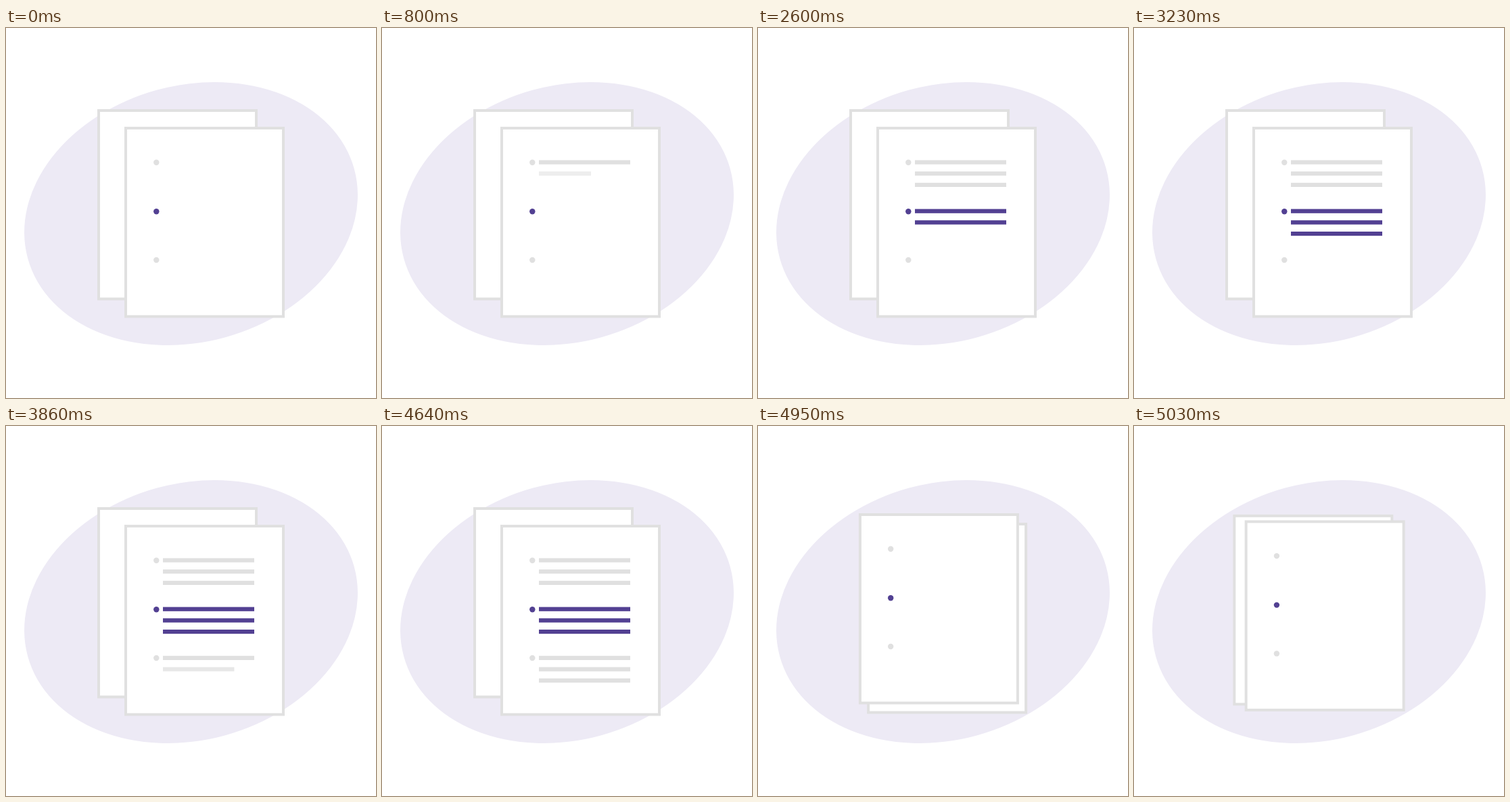
An HTML page that plays this animation: 547x547 px, repeating every 5110 ms.

```html
<!DOCTYPE html>
<html lang="en">
<head>
<meta charset="utf-8">
<title>Document list</title>
<style>
  html, body { margin: 0; height: 100%; overflow: hidden; background: #fff; }
  svg { display: block; width: 100vw; height: 100vh; }
</style>
</head>
<body>
<svg viewBox="0 0 547 547">
  <ellipse cx="273.5" cy="274.5" rx="250.2" ry="189.6" fill="#edeaf5" transform="rotate(-15.3 273.5 274.5)"/>
  <g id="pages"></g>
</svg>
<script>
const LOOP = 5110, FRAMES = 65, STEP = LOOP / FRAMES;
const GREY = '#e0e0e0', PURPLE = '#524092';
const GROW = 3.45;                                        // steps a bar takes to grow
const STARTS = [3, 9.37, 16, 22.37, 29, 35.37, 42, 48, 55]; // step at which each bar starts
const SPREAD = 61;                                        // step at which the pages part
const BACK = [-40, -26];
const pages = document.getElementById('pages');

function add(parent, tag, attrs) {
  const el = document.createElementNS('http://www.w3.org/2000/svg', tag);
  for (const key in attrs) el.setAttribute(key, attrs[key]);
  return parent.appendChild(el);
}

function makePage() {
  const page = add(pages, 'g', {});
  add(page, 'rect', { x: 177, y: 148, width: 233, height: 278.5, fill: '#fff', stroke: GREY, 'stroke-width': 4 });
  [198.7, 271.2, 343].forEach((cy, i) =>
    add(page, 'circle', { cx: 222.3, cy, r: 4.2, fill: i === 1 ? PURPLE : GREY }));
  return page;
}

const back = makePage(), front = makePage();
const bars = STARTS.map((_, i) => {
  const group = Math.floor(i / 3);
  return add(front, 'rect', {
    x: 232, y: 195.4 + 72.2 * group + 16.7 * (i % 3), height: 6.2,
    fill: group === 1 ? PURPLE : GREY
  });
});

// Ease out with a slight overshoot
function overshoot(u) {
  const v = 1 - Math.min(1, Math.max(0, u));
  return 1 - 1.95 * v ** 3 + 0.95 * v * v;
}

const place = (page, x, y) => page.setAttribute('transform', `translate(${x} ${y})`);

function draw(k) {
  bars.forEach((bar, i) => {
    const p = overshoot((k - STARTS[i]) / GROW);
    bar.setAttribute('width', Math.max(0, 135 * p));
    bar.setAttribute('opacity', Math.min(1, Math.max(0, p)));
  });

  // The pages part, change order and slide into each other's place
  const apart = k >= SPREAD ? 20 : 0;
  const q = Math.max(0, (k - SPREAD) / (FRAMES - SPREAD));
  const e = 1 - (1 - q) ** 1.2;
  const dip = 3 * Math.sin(Math.PI * q);
  const [bx, by] = BACK;
  place(front, apart + (bx - apart) * e, apart + (by - apart) * e + dip);
  place(back, (bx - apart) * (1 - e), (by - apart) * (1 - e) + dip);
  const top = k > SPREAD ? back : front;
  if (pages.lastChild !== top) pages.appendChild(top);
}

function tick() {
  const t = performance.now() % LOOP;
  draw(Math.min(FRAMES - 1, Math.floor((t + 2) / STEP)));
  requestAnimationFrame(tick);
}
tick();
</script>
</body>
</html>
```
